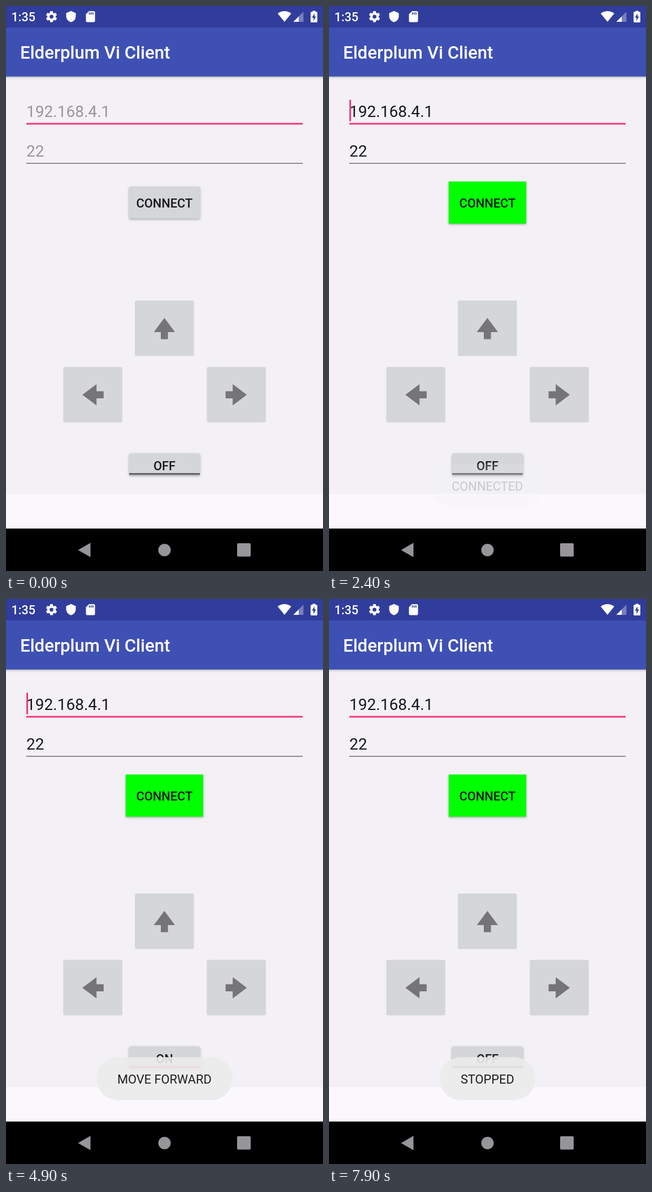
Animation of 561 by 998 pixels, one loop 8 s. Source, as an HTML page with a canvas:

```html
<!DOCTYPE html>
<html lang="en">
<head>
<meta charset="utf-8">
<title>Remote control app</title>
<style>
html, body { margin: 0; width: 100%; height: 100%; overflow: hidden; background: #000; }
canvas { display: block; width: 561px; height: 998px; }
</style>
</head>
<body>
<canvas id="stage" width="561" height="998"></canvas>
<script>
const ctx = document.getElementById('stage').getContext('2d');
const LOOP = 8000, STEP = 100, FADE = 500;
const ACCENT = '#f5397e', BUTTON = '#d4d6d7', ICON = '#757478', INK = '#19191b';
const CONNECTED_AT = 2300, RUN_AT = 4400, STOP_AT = 7300;

const clamp = v => Math.max(0, Math.min(1, v));
const within = (t, from, to) => t >= from && t < to;

function rect(x, y, w, h, color) {
  ctx.fillStyle = color;
  ctx.fillRect(x, y, w, h);
}

function box(x, y, w, h, r, color) {
  ctx.beginPath();
  ctx.roundRect(x, y, w, h, r);
  ctx.fillStyle = color;
  ctx.fill();
}

function raised(x, y, w, h, r, color, depth = 4) {
  ctx.save();
  ctx.shadowColor = 'rgba(0,0,0,.32)';
  ctx.shadowBlur = depth;
  ctx.shadowOffsetY = depth / 2.5;
  box(x, y, w, h, r, color);
  ctx.restore();
}

function poly(points, color) {
  ctx.beginPath();
  points.forEach(([x, y]) => ctx.lineTo(x, y));
  ctx.closePath();
  ctx.fillStyle = color;
  ctx.fill();
}

function disc(x, y, r, color) {
  ctx.beginPath();
  ctx.arc(x, y, r, 0, Math.PI * 2);
  ctx.fillStyle = color;
  ctx.fill();
}

function label(str, x, y, size, color, weight = 400, align = 'left') {
  ctx.font = `${weight} ${size}px Roboto, sans-serif`;
  ctx.textAlign = align;
  ctx.fillStyle = color;
  ctx.fillText(str, x, y);
}

function ripple(x, y, w, h, cx, cy, radius, alpha) {
  if (alpha <= 0) return;
  ctx.save();
  ctx.beginPath();
  ctx.roundRect(x, y, w, h, 3);
  ctx.clip();
  disc(cx, cy, radius, `rgba(0,0,0,${alpha})`);
  ctx.restore();
}

function gear(x, y) {
  ctx.save();
  ctx.translate(x, y);
  for (let i = 0; i < 6; i++) {
    poly([[-3.2, -5], [-2.3, -9.8], [2.3, -9.8], [3.2, -5]], '#fff');
    ctx.rotate(Math.PI / 3);
  }
  disc(0, 0, 7.4, '#fff');
  disc(0, 0, 3.4, '#303d9c');
  ctx.restore();
}

function shield() {
  ctx.beginPath();
  ctx.moveTo(115, 8.8);
  ctx.lineTo(123.5, 12.4);
  ctx.lineTo(123.5, 18);
  ctx.bezierCurveTo(123.5, 23, 120, 27.3, 115, 28.6);
  ctx.bezierCurveTo(110, 27.3, 106.5, 23, 106.5, 18);
  ctx.lineTo(106.5, 12.4);
  ctx.fillStyle = '#fff';
  ctx.fill();
}

function memoryCard() {
  poly([[147, 9], [156, 9], [157.5, 10.5], [157.5, 27], [156, 28.5], [143, 28.5], [141.5, 27], [141.5, 14.6]], '#fff');
  for (let i = 0; i < 3; i++) rect(146.8 + i * 3.1, 11.2, 1.7, 4, '#303d9c');
}

function wifi() {
  ctx.beginPath();
  ctx.moveTo(492.8, 28);
  ctx.lineTo(480.8, 13.2);
  ctx.quadraticCurveTo(492.8, 4.8, 504.8, 13.2);
  ctx.fillStyle = '#fff';
  ctx.fill();
}

function battery() {
  rect(542.5, 8.5, 5, 3, '#fff');
  box(539, 10.3, 12, 18.7, 1.5, '#fff');
  poly([[546, 13], [541.4, 20.5], [544.2, 20.5], [544.2, 26.3], [548.7, 18.6], [546, 18.6]], '#303d9c');
}

function statusBar() {
  rect(0, 0, 561, 38, '#303d9c');
  label('1:35', 9.5, 26.5, 21.5, '#fff', 500);
  gear(80.5, 18.8);
  shield();
  memoryCard();
  wifi();
  poly([[526.3, 10], [526.3, 28], [508.5, 28]], 'rgba(255,255,255,.35)');
  poly([[518, 18.4], [518, 28], [508.5, 28]], '#fff');
  battery();
}

function appBar() {
  ctx.save();
  ctx.shadowColor = 'rgba(0,0,0,.3)';
  ctx.shadowBlur = 5;
  ctx.shadowOffsetY = 1.5;
  rect(-10, 37.4, 581, 87.2, '#3f50b4');
  ctx.restore();
  label('Elderplum Vi Client', 25, 93, 31.2, '#fff', 500);
}

function navBar() {
  rect(0, 923, 561, 75, '#000');
  const gray = '#979599';
  poly([[127.5, 961], [149.5, 948.3], [149.5, 973.5]], gray);
  disc(280.5, 961, 11, gray);
  box(409, 949, 24, 23.5, 2, gray);
}

function cursorVisible(t) {
  return within(t, 500, 1000) || within(t, 1500, 3800) || within(t, 4200, 5800) ||
    within(t, 6400, 6900) || within(t, 7400, 7900);
}

function fields(t) {
  const color = t < CONNECTED_AT ? '#98969a' : INK;
  label('192.168.4.1', 36, 195.8, 28.05, color);
  label('22', 36, 266.2, 28.05, color);
  rect(36, 206.5, 489, 3, ACCENT);
  rect(36, 277, 489, 1.6, '#78767a');
  if (cursorVisible(t)) rect(36, 165.5, 3, 38, ACCENT);
}

function connectButton(t) {
  if (t < CONNECTED_AT) {
    raised(218, 319.2, 125, 56.2, 3, BUTTON);
    if (t >= 2200) ripple(218, 319.2, 125, 56.2, 280, 348, 50, .12);
  } else {
    raised(211.8, 310, 137.2, 74.5, 0, '#00ff00');
  }
  label('CONNECT', 280.3, 355.6, 21.8, INK, 500, 'center');
}

function arrowButton(x, y, cx, cy, angle) {
  box(x, y, 104.5, 98, 3, BUTTON);
  ctx.save();
  ctx.translate(cx, cy);
  ctx.rotate(angle);
  poly([[0, -19], [18.7, 6], [6.3, 6], [6.3, 18.6], [-6.3, 18.6], [-6.3, 6], [-18.7, 6]], ICON);
  ctx.restore();
}

function arrows(t) {
  arrowButton(228, 520.2, 280.3, 570, 0);
  arrowButton(101.3, 637.4, 154.2, 686.8, -Math.PI / 2);
  arrowButton(355.3, 637.4, 407.2, 686.8, Math.PI / 2);
  if (t >= 4200) {
    const radius = 35 + (t - 4200) * .2;
    ripple(228, 520.2, 104.5, 98, 280, 570, radius, .12 * clamp((4600 - t) / 200));
  }
}

function toggle(t) {
  const on = within(t, RUN_AT, STOP_AT);
  const pressed = within(t, 7200, 7500);
  raised(218, 790.3, 125, 38.2, [3, 3, 0, 0], BUTTON, pressed ? 9 : 4);
  if (t >= 7200) {
    ripple(218, 790.3, 125, 38.2, 288.5, 806, 48.5 + (t - 7200) * .2, .13 * clamp((7500 - t) / 200));
  }
  rect(218, 825, 125, 3.2, on ? ACCENT : '#676569');
  label(on ? 'ON' : 'OFF', 280.5, 819.8, 21.8, INK, 500, 'center');
}

// Fades in decelerating, fades out accelerating.
function toast(t, str, width, start, end) {
  if (t < start || t > end + FADE) return;
  const enter = 1 - (1 - clamp((t - start) / FADE)) ** 2;
  const leave = 1 - clamp((t - end) / FADE) ** 2;
  ctx.save();
  ctx.globalAlpha = enter * leave;
  box(280.5 - width / 2, 809.3, width, 75.7, 37.8, 'rgba(236,236,236,.91)');
  label(str, 280.3, 856, 21.8, '#1c1c1c', 400, 'center');
  ctx.restore();
}

function draw(t) {
  rect(0, 0, 561, 998, '#f3f1f5');
  rect(0, 862, 561, 61, '#faf8fc');
  appBar();
  statusBar();
  fields(t);
  connectButton(t);
  arrows(t);
  toggle(t);
  toast(t, 'CONNECTED', 200, 2350, 4300);
  toast(t, 'MOVE FORWARD', 241.5, 4450, 6400);
  toast(t, 'STOPPED', 170.5, 7370, LOOP);
  navBar();
}

function tick() {
  const t = performance.now() % LOOP;
  draw(Math.floor(t / STEP) * STEP);
  requestAnimationFrame(tick);
}
tick();
</script>
</body>
</html>
```
